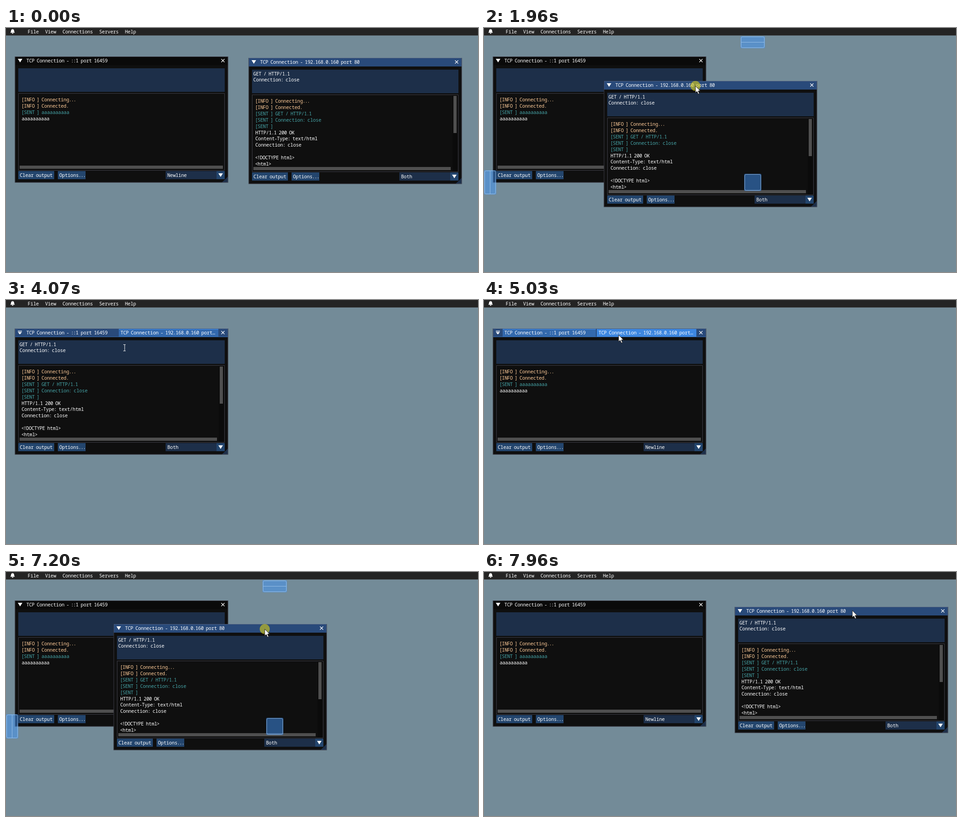
These frames come from a looping animation (1038x539 px, 8 s). An HTML page with a canvas:

```html
<!DOCTYPE html>
<html lang="en">
<head>
<meta charset="utf-8">
<title>TCP windows</title>
<style>
html, body { margin: 0; width: 100%; height: 100%; overflow: hidden; background: #738b98 }
canvas { display: block }
</style>
</head>
<body>
<canvas id="stage" width="1038" height="539"></canvas>
<script>
const g = document.getElementById('stage').getContext('2d');
const LOOP = 8000, STEP = 68;
const W = 468, H = 278, BAR = 19, HOME = { x: 20, y: 63 };
const TITLE = '#294a7a', FIELD = '#1d2f49', BUTTON = '#23456d', THUMB = '#4f4f4f';
const EDGE = 'rgba(110,110,128,.5)', TAB = '#3369ad', HOVER = '#3d87e0', WHITE = '#fff';

const opening = ['[INFO ] Connecting...', '[INFO ] Connected.'];
const request = ['GET / HTTP/1.1', 'Connection: close'];
const local = {
  title: 'TCP Connection - ::1 port 16459', ending: 'Newline', input: [],
  log: [...opening, '[SENT ] aaaaaaaaaa', 'aaaaaaaaaa']
};
const web = {
  title: 'TCP Connection - 192.168.0.160 port 80', ending: 'Both', input: request, scrolls: true,
  log: [...opening, ...request.map(s => '[SENT ] ' + s), '[SENT ]', 'HTTP/1.1 200 OK',
    'Content-Type: text/html', 'Connection: close', '', '<!DOCTYPE html>', '<html>']
};

// Each gesture starts where the last one rested; keys are [step, x, y], hold counts pressed steps
const gestures = [
  { at: 530, keys: [[0, 889, 441], [9, 799, 81]] },
  { at: 1360, keys: [[0, 799, 77]] },
  { at: 1560, hold: Infinity, keys: [[5, 529, 128], [6, 465, 128], [11, 247, 208]] },
  { at: 3320, keys: [[11, 261, 106]] },
  { at: 4140, keys: [[2, 205, 75]] },
  { at: 4540, hold: 2, keys: [[2, 205, 75], [7, 296, 77]] },
  { at: 5630, hold: 2, keys: [] },
  { at: 6040, keys: [[1, 284, 81], [2, 284, 81], [7, 278, 71]] },
  { at: 6720, hold: 16, keys: [[6, 495, 123], [7, 569, 126], [12, 810, 85]] }
];
let rest;
for (const m of gestures) {
  if (!m.keys.length || m.keys[0][0] > 0) m.keys.unshift([0, ...rest]);
  rest = m.keys[m.keys.length - 1].slice(1);
}
const [dragIn, dragOut] = gestures.filter(m => m.hold > 2);

// Monotone cubic through the keys, at rest at both ends
function along(keys, step, axis) {
  const slope = i => (keys[i + 1][axis] - keys[i][axis]) / (keys[i + 1][0] - keys[i][0]);
  const tangent = i => {
    if (!i || i === keys.length - 1) return 0;
    const a = slope(i - 1), b = slope(i);
    return a * b > 0 ? 2 * a * b / (a + b) : 0;
  };
  const next = keys.findIndex(k => k[0] > step);
  if (next < 0) return keys[keys.length - 1][axis];
  const i = next - 1, span = keys[next][0] - keys[i][0], u = (step - keys[i][0]) / span, v = 1 - u;
  return Math.round(keys[i][axis] * v * v * (1 + 2 * u) + keys[next][axis] * u * u * (1 + 2 * v)
    + span * u * v * (tangent(i) * v - tangent(next) * u));
}
const pointer = (m, step) => [along(m.keys, step, 1), along(m.keys, step, 2)];

function box(x, y, w, h, fill) {
  g.fillStyle = fill;
  g.fillRect(x, y, w, h);
}

function stroke(color, width = 1) {
  g.strokeStyle = color;
  g.lineWidth = width;
  g.stroke();
}

function outline(x, y, w, h) {
  g.beginPath();
  g.rect(x + 0.5, y + 0.5, w - 1, h - 1);
  stroke(EDGE);
}

function shape(points, fill, edge) {
  g.beginPath();
  points.forEach(p => g.lineTo(...p));
  g.closePath();
  g.fillStyle = fill;
  g.fill();
  if (edge) stroke(edge);
}

function clipped(x, y, w, h, draw) {
  g.save();
  g.beginPath();
  g.rect(x, y, w, h);
  g.clip();
  draw();
  g.restore();
}

const advance = c => /[a-z\/]/.test(c) ? 6.1 : /[A-Z0-9…]/.test(c) ? 5.9 : 5;

function text(s, x, baseline, color = WHITE) {
  g.font = '10.5px "Noto Sans Mono", "DejaVu Sans Mono", monospace';
  g.textAlign = 'center';
  g.fillStyle = color;
  for (const c of s) {
    g.fillText(c, x + advance(c) / 2, baseline);
    x += advance(c);
  }
}

function down(x, y) {
  shape([[x, y], [x + 10, y], [x + 5, y + 8]], WHITE);
}

function closeMark(x, y, r = 3.5) {
  g.beginPath();
  for (const s of [-r, r]) {
    g.moveTo(x - r, y - s);
    g.lineTo(x + r, y + s);
  }
  stroke(WHITE, 1.2);
}

function button(label, x, w) {
  box(x, 253, w, 18, BUTTON);
  text(label, x + 3.5, 266);
}

const logColor = s => s.startsWith('[INFO') ? '#ffcc99' : s.startsWith('[SENT') ? '#46a5a8' : WHITE;

function body(c) {
  box(7, 26, 454, 52, FIELD);
  c.input.forEach((s, i) => text(s, 10, 39 + 13 * i));
  outline(7, 81, 454, 171);
  clipped(8, 82, c.scrolls ? 441 : 452, 158, () =>
    c.log.forEach((s, i) => text(s, 14.5, 99 + 13.9 * i, logColor(s))));
  if (c.scrolls) {
    box(448, 82, 12, 169, '#0b0b0b');
    box(450, 84, 7, 82, THUMB);
  }
  box(10, 241, c.scrolls ? 434 : 447, 7, THUMB);
  button('Clear output', 7, 79);
  button('Options...', 94, 61);
  box(331, 253, 112, 18, FIELD);
  button('', 443, 18);
  text(c.ending, 335, 266);
  down(447, 258);
  shape([[W - 13, H], [W, H], [W, H - 13]], FIELD);
}

function panel(c, x, y, titleColor, header) {
  g.save();
  g.translate(x, y);
  box(-0.5, 0, W + 1, H + 0.5, '#0f0f0f');
  box(0, 0, W, BAR, titleColor);
  body(c);
  if (header) header();
  else {
    down(6, 5);
    text(c.title, 25, 13);
  }
  closeMark(457, 9);
  outline(-0.5, 0, W + 1, H + 0.5);
  g.restore();
}

function docked(active, mx, my) {
  panel(active, HOME.x, HOME.y, TITLE, () => {
    const tabs = [[local, 21, 205, local.title], [web, 228, 219, web.title.replace(' 80', '…')]];
    for (const [c, x, w, label] of tabs) {
      const over = my < 81 && mx >= x + HOME.x && mx < x + w + HOME.x;
      if (over || c === active) box(x, 1, w, BAR - 1, over ? HOVER : TAB);
      if (c === active) box(x, 1, w, 1, '#4296fa');
      text(label, x + 4, 13);
    }
    box(0, BAR - 1, W, 1, TAB);
    box(6, 5, 9, 1.5, WHITE);
    shape([[6, 8], [15, 8], [10.5, 13]], WHITE);
  });
}

// A drop target centred on cx, cy with an optional dividing line
function target(cx, cy, w, h, split, hot) {
  const x = cx - w / 2, y = cy - h / 2;
  g.beginPath();
  g.roundRect(x, y, w, h, 3);
  g.fillStyle = `rgba(66,150,250,${hot ? 0.65 : 0.5})`;
  g.fill();
  g.beginPath();
  g.roundRect(x + 1.5, y + 1.5, w - 3, h - 3, 3);
  if (split === 'v') { g.moveTo(cx, y + 2); g.lineTo(cx, y + h - 2); }
  if (split === 'h') { g.moveTo(x + 2, cy); g.lineTo(x + w - 2, cy); }
  stroke('rgba(200,228,255,.55)');
}

function dockTargets(x, y) {
  if (x < HOME.x || x > HOME.x + W || y < HOME.y || y > HOME.y + H) {
    target(591, 31.5, 54, 27, 'h');
    target(13.5, 341, 27, 54, 'v');
    target(591, 341, 38, 38);
    return;
  }
  const cx = HOME.x + W / 2, cy = HOME.y + H / 2;
  const hot = Math.max(Math.abs(x - cx), Math.abs(y - cy)) < 19;
  if (hot || y < HOME.y + BAR) {
    box(HOME.x, HOME.y + BAR, W, H - BAR, 'rgba(66,150,250,.25)');
    box(248, 64, 219, BAR - 1, '#3068b3');
    clipped(248, 64, 219, BAR - 1, () => text(web.title, 252, 76));
  }
  target(cx, cy, 38, 38, '', hot);
  for (const s of [-1, 1]) {
    target(cx, cy + 46.5 * s, 38, 33, 'h');
    target(cx + 46.5 * s, cy, 33, 38, 'v');
  }
}

function menu() {
  box(0, 0, 1038, 16, '#242424');
  box(0, 16, 1038, 1, '#50585e');
  let x = 48;
  for (const s of ['File', 'View', 'Connections', 'Servers', 'Help']) {
    text(s, x, 11.5);
    x += [...s].reduce((sum, c) => sum + advance(c), 14);
  }
  g.beginPath();
  g.moveTo(9.5, 10.5);
  g.bezierCurveTo(12, 8, 10, 2.5, 14.5, 2.5);
  g.bezierCurveTo(19, 2.5, 17, 8, 19.5, 10.5);
  g.fillStyle = WHITE;
  g.fill();
  box(13, 11, 3, 1.5, WHITE);
}

function tooltip(x, y) {
  box(x, y, 232, 28, '#141414');
  outline(x, y, 232, 28);
  text(web.title, x + 8, y + 18);
}

function drawPointer(x, y, beam, pressed) {
  if (pressed) {
    g.beginPath();
    g.arc(x, y, 11, 0, 7);
    g.fillStyle = 'rgba(220,208,24,.6)';
    g.fill();
  }
  if (beam) {
    box(x - 0.5, y - 7, 1, 14, WHITE);
    for (const end of [-8, 6]) box(x - 3, y + end, 5, 1, WHITE);
  } else {
    shape([[0, 0], [0, 15], [3.5, 12], [6, 18], [8.5, 17], [6, 11], [10.5, 11]]
      .map(([dx, dy]) => [x + dx, y + dy]), WHITE, '#222');
  }
}

function draw(t) {
  const move = gestures.filter(m => m.at <= t).pop() || gestures[0];
  const step = Math.max(0, Math.floor((t - move.at) / STEP + 0.2));
  const [x, y] = pointer(move, step);
  const pressed = step < (move.hold || 0);
  const joined = t >= 3320 && t < dragOut.at + STEP;
  box(0, 0, 1038, 539, '#738b98');
  menu();
  if (joined) {
    docked(t >= 4540 && t < 5630 ? local : web, x, y);
    if (t >= 5230 && t < 5630 || move.at === 6040 && step < 1) tooltip(x + 16, y + 10);
  } else {
    // The dragged window trails the pointer by one step
    const drag = t < 3320 ? dragIn : dragOut;
    const [lx, ly] = pointer(drag, move === drag ? Math.max(0, step - 1) : 0);
    const [gx, gy] = drag === dragIn ? [265, 11] : [258, 8];
    panel(local, HOME.x, HOME.y, '#0a0a0a');
    panel(web, lx - gx, ly - gy, TITLE);
    if (pressed) dockTargets(lx, ly);
  }
  const beam = joined && x > 27 && x < 481 && y >= 89 && y < 141;
  if (t >= 530) drawPointer(x, y, beam, pressed);
}

function frame() {
  draw(performance.now() % LOOP);
  requestAnimationFrame(frame);
}
frame();
</script>
</body>
</html>
```
